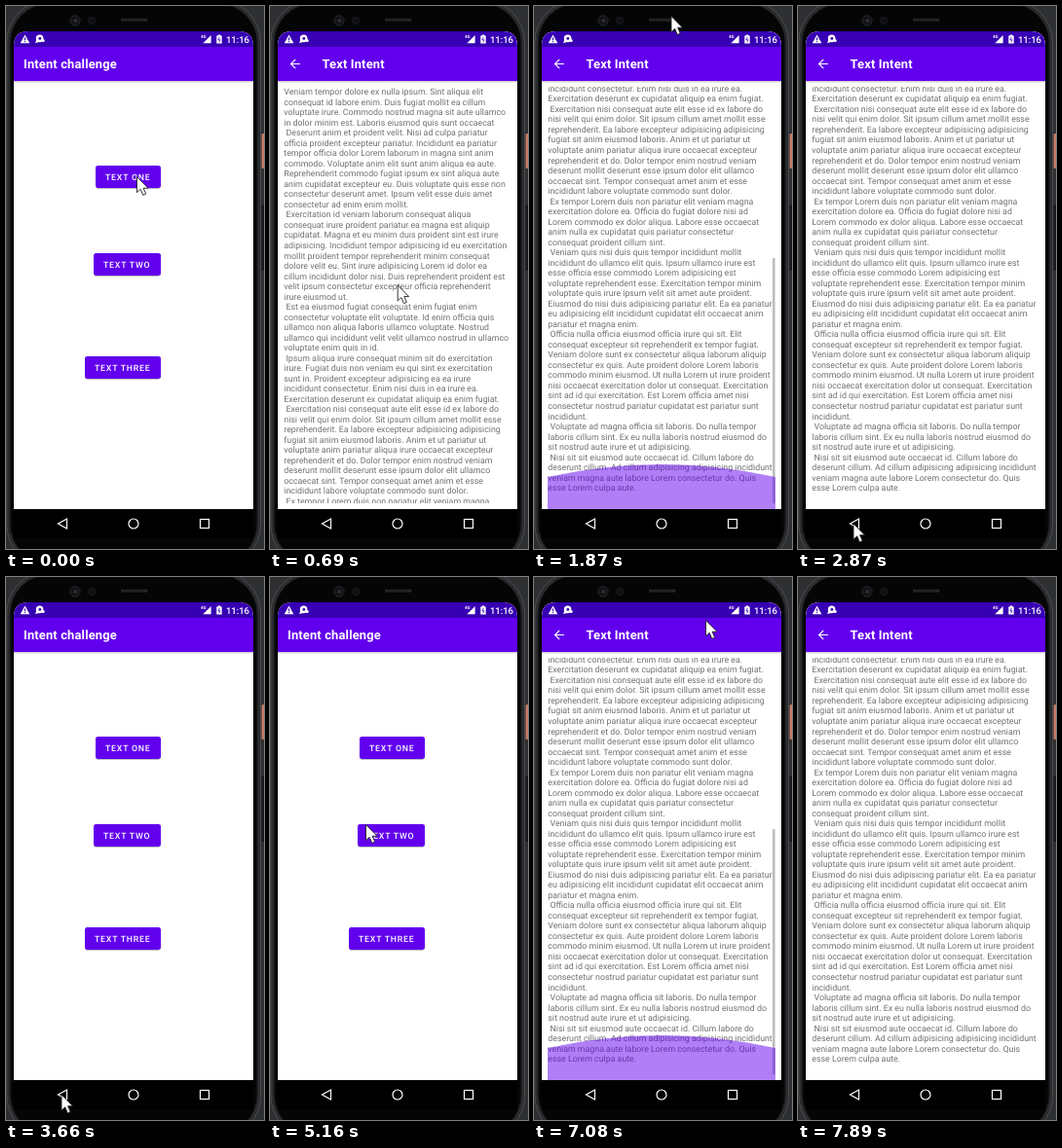
Recreate the animation shown at these times as an HTML page. Size 265 px wide and 558 px high, loop 8000 ms.

```html
<!DOCTYPE html>
<html lang="en">
<head>
<meta charset="utf-8">
<title>Intent challenge</title>
<style>
html, body { margin: 0; width: 100%; height: 100%; overflow: hidden; background: #2e2f31; }
svg { display: block; width: 265px; height: 558px; }
text { font-family: Roboto, sans-serif; text-rendering: geometricPrecision; white-space: pre; }
.title { font-size: 12.9px; font-weight: 600; letter-spacing: .0125em; fill: #fff; }
.label { font-size: 8.77px; font-weight: 500; letter-spacing: .0893em; fill: #fff; }
.body text { font-size: 8.8px; fill: #707070; }
.clock { font-size: 9.5px; font-weight: 500; fill: #fff; }
.net { font-size: 4.5px; font-weight: 700; fill: #fff; }
.line { fill: none; stroke: #fff; stroke-width: 1.2; }
</style>
</head>
<body>
<svg viewBox="0 0 265 558">
  <defs>
    <clipPath id="screen"><path d="M8 517V41Q8 26 23 26H239Q254 26 254 41V517Z"/></clipPath>
    <clipPath id="reveal"><rect id="revealBox" x="8" y="26" width="246" height="491"/></clipPath>
    <clipPath id="view"><rect x="14" y="83" width="234" height="428"/></clipPath>
    <linearGradient id="shade" x2="0" y2="1">
      <stop stop-color="#000" stop-opacity=".22"/>
      <stop offset="1" stop-color="#000" stop-opacity="0"/>
    </linearGradient>
    <g id="bars">
      <rect x="8" y="20" width="246" height="520" fill="#fff"/>
      <rect x="8" y="77" width="246" height="2.5" fill="url(#shade)"/>
      <rect x="8" y="42" width="246" height="35" fill="#6200ee"/>
      <rect x="8" y="20" width="246" height="22" fill="#3700b3"/>
    </g>
  </defs>

  <rect width="265" height="558" fill="#2e2f31"/>
  <rect x="262.5" y="131" width="4" height="36" rx="1.5" fill="#c47a68"/>
  <rect x="262.5" y="204" width="2.5" height="68" rx="1" fill="#17181a"/>
  <rect x=".8" y="-6" width="260.8" height="582" rx="43" fill="#2b2c2e" stroke="#4b4d50"/>
  <rect x="4.2" y="-2.5" width="253.8" height="575" rx="40" fill="#050506" stroke="#1c1d1f"/>
  <circle cx="71" cy="15" r="5.2" fill="#111214" stroke="#26272a"/>
  <circle cx="71.5" cy="15" r="2" fill="#2d2f35"/>
  <circle cx="88" cy="15" r="3.6" fill="#0f1012" stroke="#1b1c1f"/>
  <path d="M118.5 14.3H145" stroke="#38393c" stroke-width="3" stroke-dasharray="1.2 .9"/>

  <g clip-path="url(#screen)">
    <g id="home">
      <use href="#bars"/>
      <text class="title" x="18" y="64.2">Intent challenge</text>
      <g id="buttons"></g>
    </g>
    <rect id="dim" x="8" y="26" width="246" height="491" opacity="0"/>
    <g clip-path="url(#reveal)">
      <g id="page">
        <use href="#bars"/>
        <path class="line" d="M31 59.5H21.5M26.2 54.8L21.5 59.5L26.2 64.2"/>
        <text class="title" x="53.5" y="64.2">Text Intent</text>
        <g clip-path="url(#view)"><g id="body" class="body"></g></g>
        <rect id="thumb" x="245" y="83" width="2.6" height="252" opacity="0"/>
        <path id="glow" fill="#6200ee" opacity="0"/>
      </g>
    </g>
  </g>

  <g fill="#fff">
    <path d="M19.5 29.5L24.3 38.3H14.7Z"/>
    <path d="M19.5 32.3V35.3M19.5 36.1V37.2" stroke="#3700b3"/>
    <circle cx="34.6" cy="33.4" r="3.8"/>
    <path d="M30 38L31.4 34.5L34 37Z"/>
    <circle cx="34.8" cy="33.4" r="1.4" fill="#3700b3"/>
    <circle cx="38.2" cy="35.6" r="1.5"/>
    <text class="net" x="200" y="33">4G</text>
    <path d="M210.6 30V38.2H202.4Z"/>
    <path d="M216.3 30.6H217.8V29.6H220.2V30.6H221.7V38.5H216.3Z"/>
    <path d="M219.4 31.8L217.9 34.8H220.1L218.7 37.3" fill="none" stroke="#3700b3" stroke-width=".8"/>
    <text class="clock" x="225.9" y="37.6">11:16</text>
  </g>

  <rect x="8" y="517" width="246" height="30" fill="#000"/>
  <ellipse id="navRipple" cx="58" cy="532" rx="26" ry="14.5" fill="#fff" opacity="0"/>
  <path class="line" d="M62.5 527V537L53.5 532Z"/>
  <circle class="line" cx="131" cy="532" r="5"/>
  <rect class="line" x="199.5" y="527.5" width="9" height="9"/>

  <path id="cursor" d="M0 0V16.2L3.7 12.8L6.3 18.9L9.2 17.6L6.6 11.7H11.5Z"
    fill="#fff" stroke="#222" stroke-width=".9" stroke-linejoin="round"/>
</svg>

<script>
const $ = id => document.getElementById(id);
const NS = 'http://www.w3.org/2000/svg';
function add(parent, tag, attrs, content = '') {
  const el = document.createElementNS(NS, tag);
  for (const k in attrs) el.setAttribute(k, attrs[k]);
  el.textContent = content;
  return parent.appendChild(el);
}

const LINE = 10.52, MAX = 308.4, LOOP = 8000, STEP = 120;

const copy = `Veniam tempor dolore ex nulla ipsum. Sint aliqua elit
consequat id labore enim. Duis fugiat mollit ea cillum
voluptate irure. Commodo nostrud magna sit aute ullamco
in dolor minim est. Laboris eiusmod quis sunt occaecat
 Deserunt anim et proident velit. Nisi ad culpa pariatur
officia proident excepteur pariatur. Incididunt ea pariatur
tempor officia dolor Lorem laborum in magna sint anim
commodo. Voluptate anim elit sunt anim aliqua ea aute.
Reprehenderit commodo fugiat ipsum ex sint aliqua aute
anim cupidatat excepteur eu. Duis voluptate quis esse non
consectetur deserunt amet. Ipsum velit esse duis amet
consectetur ad enim enim mollit.
 Exercitation id veniam laborum consequat aliqua
consequat irure proident pariatur ea magna est aliquip
cupidatat. Magna et eu minim duis proident sint est irure
adipisicing. Incididunt tempor adipisicing id eu exercitation
mollit proident tempor reprehenderit minim consequat
dolore velit eu. Sint irure adipisicing Lorem id dolor ea
cillum incididunt dolor nisi. Duis reprehenderit proident est
velit ipsum consectetur excepteur officia reprehenderit
irure eiusmod ut.
 Est ea eiusmod fugiat consequat enim fugiat enim
consectetur voluptate elit voluptate. Id enim officia quis
ullamco non aliqua laboris ullamco voluptate. Nostrud
ullamco qui incididunt velit velit ullamco nostrud in ullamco
voluptate enim quis in id.
 Ipsum aliqua irure consequat minim sit do exercitation
irure. Fugiat duis non veniam eu qui sint ex exercitation
sunt in. Proident excepteur adipisicing ea ea irure
incididunt consectetur. Enim nisi duis in ea irure ea.
Exercitation deserunt ex cupidatat aliquip ea enim fugiat.
 Exercitation nisi consequat aute elit esse id ex labore do
nisi velit qui enim dolor. Sit ipsum cillum amet mollit esse
reprehenderit. Ea labore excepteur adipisicing adipisicing
fugiat sit anim eiusmod laboris. Anim et ut pariatur ut
voluptate anim pariatur aliqua irure occaecat excepteur
reprehenderit et do. Dolor tempor enim nostrud veniam
deserunt mollit deserunt esse ipsum dolor elit ullamco
occaecat sint. Tempor consequat amet anim et esse
incididunt labore voluptate commodo sunt dolor.
 Ex tempor Lorem duis non pariatur elit veniam magna
exercitation dolore ea. Officia do fugiat dolore nisi ad
Lorem commodo ex dolor aliqua. Labore esse occaecat
anim nulla ex cupidatat quis pariatur consectetur
consequat proident cillum sint.
 Veniam quis nisi duis quis tempor incididunt mollit
incididunt do ullamco elit quis. Ipsum ullamco irure est
esse officia esse commodo Lorem adipisicing est
voluptate reprehenderit esse. Exercitation tempor minim
voluptate quis irure ipsum velit sit amet aute proident.
Eiusmod do nisi duis adipisicing pariatur elit. Ea ea pariatur
eu adipisicing elit incididunt cupidatat elit occaecat anim
pariatur et magna enim.
 Officia nulla officia eiusmod officia irure qui sit. Elit
consequat excepteur sit reprehenderit ex tempor fugiat.
Veniam dolore sunt ex consectetur aliqua laborum aliquip
consectetur ex quis. Aute proident dolore Lorem laboris
commodo minim eiusmod. Ut nulla Lorem ut irure proident
nisi occaecat exercitation dolor ut consequat. Exercitation
sint ad id qui exercitation. Est Lorem officia amet nisi
consectetur nostrud pariatur cupidatat est pariatur sunt
incididunt.
 Voluptate ad magna officia sit laboris. Do nulla tempor
laboris cillum sint. Ex eu nulla laboris nostrud eiusmod do
sit nostrud aute irure et ut adipisicing.
 Nisi sit sit eiusmod aute occaecat id. Cillum labore do
deserunt cillum. Ad cillum adipisicing adipisicing incididunt
veniam magna aute labore Lorem consectetur do. Quis
esse Lorem culpa aute.`;
copy.split('\n').forEach((s, i) => add($('body'), 'text', { x: 14.3, y: 91.2 + i * LINE }, s));

function button(label, x, y) {
  const box = { x, y, width: 159 - x, height: 23, rx: 2.4 }, g = $('buttons');
  add(g, 'rect', { ...box, y: y + 1, opacity: .25 });
  add(g, 'rect', { ...box, fill: '#6200ee' });
  const ripple = add(g, 'rect', { ...box, fill: '#fff', opacity: 0 });
  add(g, 'text', { x: x + 10, y: y + 14.7, class: 'label' }, label);
  return ripple;
}
button('TEXT ONE', 92, 164);
const ripple = button('TEXT TWO', 90, 254);
button('TEXT THREE', 81, 360);

// Progress 0..1 that advances in n jumps, the first one at start.
const steps = (t, start, n) => Math.min(1, Math.max(0, (Math.floor((t - start) / STEP) + 1) / n));
const smooth = p => p * p * (3 - 2 * p);
const shift = (el, x, y) => el.setAttribute('transform', `translate(${x} ${y})`);
const fade = (el, v) => el.setAttribute('opacity', v);

const home = { x: 134.5, y: 175.5 };
const moves = [
  { start: 570, n: 3, x: 129.5, y: 342.5 },
  { start: 1330, n: 4, x: 141, y: 10.5 },
  { start: 2020, n: 7, x: 57, y: 532 },
  { start: 3810, n: 6, x: 98.5, y: 254.5, out: 3.4 },
  { start: 6450, n: 2, x: 110.5, y: 261.5 },
  { start: 6690, n: 3, x: 176.5, y: 44.5 },
  { start: 7380, n: 5, x: 75, y: 575 }
];
const drags = [
  { start: 1330, n: 5, power: 1.4 },
  { start: 6450, n: 6, power: 1.545 }
];

function cursorAt(t) {
  let { x, y } = home;
  for (const m of moves) {
    const p = 1 - (1 - steps(t, m.start, m.n)) ** (m.out || 1);
    x += (m.x - x) * p;
    y += (m.y - y) * p;
  }
  return [x, y];
}

function drawScroll(t) {
  const { start, n, power } = drags[t < 5000 ? 0 : 1];
  const s = MAX * steps(t, start, n) ** power;
  shift($('body'), 0, -s);
  $('thumb').setAttribute('y', 83 + s * .571);
  fade($('thumb'), t < start ? 0 : .26 * (1 - steps(t, start + 1200, 3)));

  // Overscroll glow flashes at the end of the text, then sinks.
  const a = s < MAX ? 0 : .5 * (1 - steps(t, start + n * STEP + 30, 3));
  const top = 484 + (.5 - a) * 24;
  $('glow').setAttribute('d', `M14 517V${top}Q131 ${top - 26} 248 ${top}V517Z`);
  fade($('glow'), a);
}

function draw(t) {
  shift($('cursor'), ...cursorAt(t));
  drawScroll(t);

  const open = smooth(steps(t, 150, 3)) - smooth(steps(t, 3150, 5)) + smooth(steps(t, 5550, 5));
  shift($('home'), 0, -10 * open);
  shift($('page'), 0, 20 * (1 - open));
  fade($('dim'), .1 * open);
  $('revealBox').setAttribute('y', 26 + 491 * (1 - open));

  fade(ripple, .2 * steps(t, 5280, 2));
  fade($('navRipple'), t < 3150 ? 0 : .2 * (1 - steps(t, 3270, 4)));
}

const begin = performance.now();
function tick() {
  draw((performance.now() - begin) % LOOP);
  requestAnimationFrame(tick);
}
tick();
</script>
</body>
</html>
```
